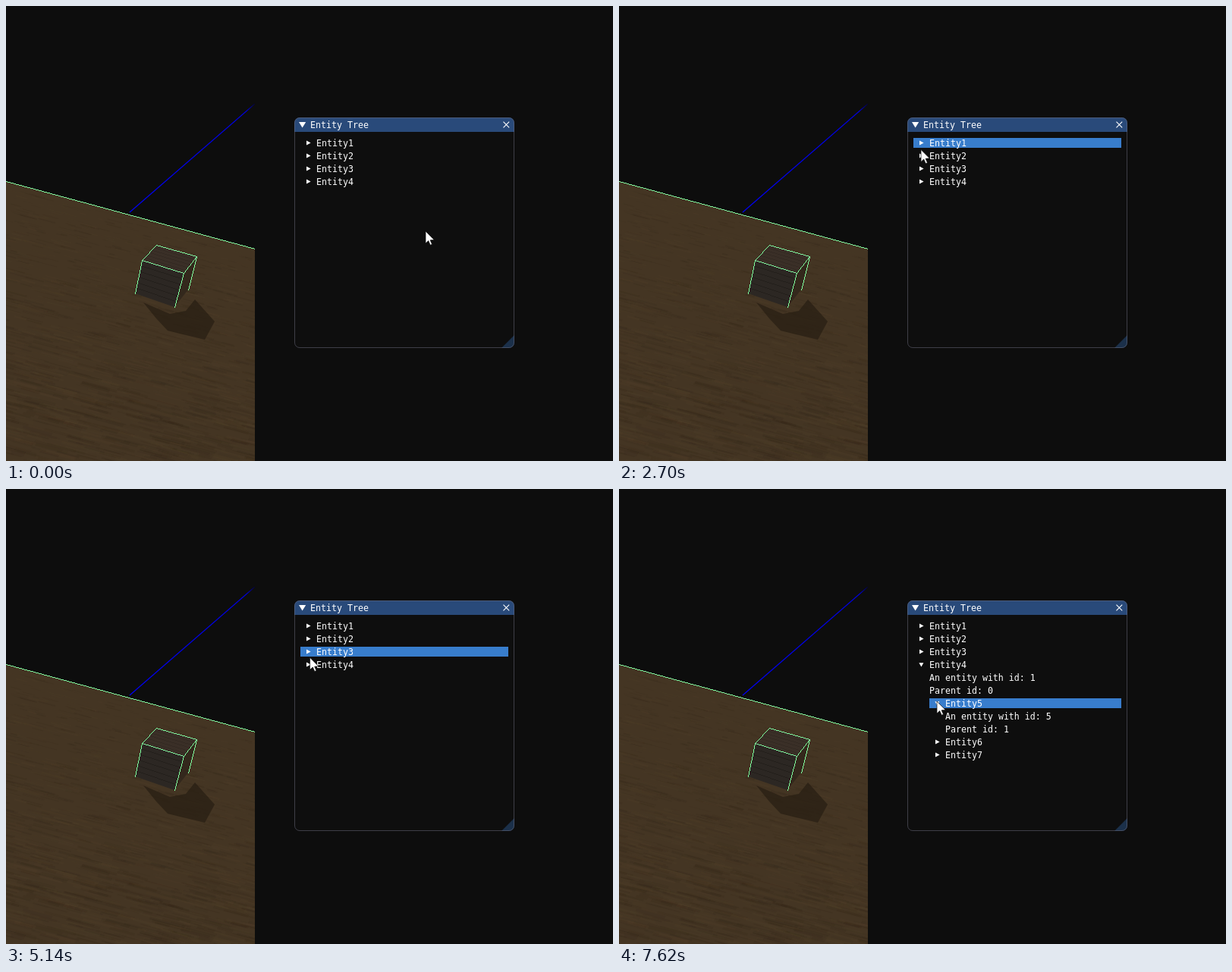
Write an HTML page with a canvas that moves like this. It is 800x600 px and loops after 8000 ms.

```html
<!DOCTYPE html>
<html lang="en">
<head>
<meta charset="utf-8">
<title>Entity tree</title>
<style>
  html, body { margin: 0; width: 100%; height: 100%; overflow: hidden; background: #0d0d0d; }
  canvas, svg { position: absolute; left: 0; top: 0; display: block; }
  text { font: 11.627px "DejaVu Sans Mono", monospace; fill: #fff; white-space: pre; }
</style>
</head>
<body>
<canvas id="scene" width="800" height="600"></canvas>
<svg width="800" height="600" viewBox="0 0 800 600">
  <rect x="380" y="147" width="290" height="304" rx="7" fill="#0e0e0e"/>
  <path d="M380 166V154a7 7 0 0 1 7-7H663a7 7 0 0 1 7 7V166Z" fill="#294a7a"/>
  <path d="M653 451L670 434V444a7 7 0 0 1-7 7Z" fill="#1b304a"/>
  <rect x="380.5" y="147.5" width="289" height="303" rx="6.5" fill="none" stroke="#6e6e80" stroke-opacity=".5"/>
  <path d="M386 153H395.2L390.6 160.6Z" fill="#fff"/>
  <path d="M655.5 152.7L663.2 160.4M663.2 152.7L655.5 160.4" stroke="#fff" stroke-width="1.1"/>
  <text x="401" y="161">Entity Tree</text>
  <g id="rows"></g>
  <path id="cursor" d="M0 0V16L3.7 12.6L6.2 18.2L8.5 17.2L6.1 11.8L11.3 11.4Z"
        fill="#fff" stroke="#111" stroke-width=".7"/>
</svg>
<script>
const LOOP = 8000, STEP = 60, PRESS = 90;
const LEFT = 388, RIGHT = 662, TOP = 174, ROW = 17, INDENT = 21;

// Where the pointer comes to rest: arrival time and place
const STOPS = [
  [150, 552, 298], [750, 422, 241], [1090, 411, 247], [1270, 404, 219],
  [1690, 398, 178], [2730, 398, 201], [3000, 398, 198], [3940, 402, 218],
  [4180, 401, 215], [5180, 400, 233], [5380, 399, 230], [6090, 433, 259],
  [6400, 421, 281], [6760, 419, 280]
];

// Press time and the node it toggles
const CLICKS = [
  [1840, "1"], [2550, "1"], [3150, "2"], [3760, "2"],
  [4390, "3"], [5050, "3"], [5910, "4"], [7530, "5"]
];

const IDS = { 1: 9, 2: 2, 3: 3, 4: 1, 5: 5 };
const CHILDREN = { 4: "567" };

// Longer ways take longer; the pointer advances in fixed time steps
function cursorAt(t) {
  let x = 553, y = 297;
  for (const [end, tx, ty] of STOPS) {
    const dx = tx - x, dy = ty - y;
    const span = STEP + Math.hypot(dx, dy) * 2.6;
    const left = STEP * Math.ceil(Math.max(0, end - t) / STEP);
    const p = Math.max(0, 1 - left / span);
    const eased = p * p * (3 - 2 * p);
    x += dx * eased;
    y += dy * eased;
    if (p < 1) break;
  }
  return [x, y];
}

function openNodes(t) {
  const open = new Set();
  for (const [time, node] of CLICKS)
    if (t >= time + PRESS && !open.delete(node)) open.add(node);
  return open;
}

function listRows(open, nodes = "1234", depth = 0, parent = 0) {
  const rows = [];
  for (const node of nodes) {
    const isOpen = open.has(node);
    rows.push({ node, depth, isOpen, label: "Entity" + node });
    if (!isOpen) continue;
    rows.push({ depth, label: "An entity with id: " + IDS[node] });
    rows.push({ depth, label: "Parent id: " + parent });
    if (CHILDREN[node]) rows.push(...listRows(open, CHILDREN[node], depth + 1, IDS[node]));
  }
  return rows;
}

function rowMarkup(row, i, hot, pressed) {
  const x = LEFT + row.depth * INDENT, y = TOP + i * ROW;
  let out = "";
  if (row.node && hot)
    out += `<rect x="${x}" y="${y}" width="${RIGHT - x}" height="13" fill="${pressed ? "#4296fa" : "#387dcc"}"/>`;
  if (row.node)
    out += row.isOpen
      ? `<path d="M${x + 7.4} ${y + 4.2}h6l-3 5.2Z" fill="#fff"/>`
      : `<path d="M${x + 8} ${y + 3.5}v6l5.6-3Z" fill="#fff"/>`;
  return out + `<text x="${x + INDENT}" y="${y + 11}">${row.label}</text>`;
}

function drawScene() {
  const g = document.getElementById("scene").getContext("2d");
  let seed = 71;
  const rand = () => (seed = seed * 16807 % 2147483647) / 2147483647;
  const mix = (a, b, p) => [a[0] + (b[0] - a[0]) * p, a[1] + (b[1] - a[1]) * p];
  const trace = pts => {
    g.beginPath();
    pts.forEach(p => g.lineTo(...p));
    g.closePath();
  };
  const poly = (fill, ...pts) => {
    trace(pts);
    g.fillStyle = fill;
    g.fill();
  };
  // Hard-edged line, one pixel wide
  const line = (color, a, b) => {
    const n = Math.max(Math.abs(b[0] - a[0]), Math.abs(b[1] - a[1]));
    g.fillStyle = color;
    for (let i = 0; i <= n; i++) g.fillRect(...mix(a, b, i / n).map(Math.round), 1, 1);
  };

  g.fillStyle = "#0d0d0d";
  g.fillRect(0, 0, 800, 600);
  g.beginPath();
  g.rect(0, 0, 328, 600);
  g.clip();

  const blue = g.createLinearGradient(163, 272, 328, 129);
  blue.addColorStop(0, "#0000f0");
  blue.addColorStop(.93, "#0000e0");
  blue.addColorStop(1, "#05052c");
  g.strokeStyle = blue;
  g.lineWidth = 1.3;
  g.beginPath();
  g.moveTo(163, 272);
  g.lineTo(328, 129);
  g.stroke();

  // Wooden floor, planks growing towards the viewer
  g.save();
  trace([[0, 231], [328, 320], [328, 600], [0, 600]]);
  g.clip();
  g.fillStyle = "#443523";
  g.fillRect(0, 0, 328, 600);
  for (let i = 0; i < 2200; i++) {
    const depth = rand() * 380, scale = .5 + depth / 330;
    const x = rand() * 400 - 60, y = 231 + x * .271 + depth;
    const w = (10 + rand() * 28) * scale, h = (.6 + rand() * 2.2) * scale;
    const drop = w * .265;
    const tone = rand() < .5 ? "38,28,17" : "92,74,48";
    poly(`rgba(${tone},${.03 + rand() * .1})`,
      [x, y], [x + w, y + drop], [x + w - h / 2, y + drop + h], [x - h / 2, y + h]);
  }
  g.restore();

  // Box and its shadow
  poly("rgba(34,25,15,.6)", [181, 391], [216, 406], [237, 402], [249, 387],
    [275, 416], [262, 440], [213, 428], [198, 412]);
  const back = [198, 315], right = [251, 330], front = [234, 352], left = [179, 335];
  const leftLow = [170, 379], frontLow = [222, 397], rightLow = [240, 374];
  poly("#33281c", front, right, rightLow, frontLow);
  poly("#2c2723", left, front, frontLow, leftLow);
  poly("#3a2f27", back, right, front, left);
  for (let p = 1 / 6; p < .99; p += 1 / 6) {
    line("#231f1b", mix(left, leftLow, p), mix(front, frontLow, p));
    line("#332922", mix(back, left, p), mix(right, front, p));
  }

  const green = "#80ffa0";
  line(green, [0, 231], [328, 320]);
  const rim = [back, right, front, left];
  rim.forEach((p, i) => line(green, p, rim[(i + 1) % 4]));
  line(green, left, leftLow);
  line(green, front, frontLow);
  line(green, right, rightLow);
}

const rowsEl = document.getElementById("rows");
const cursorEl = document.getElementById("cursor");
let shown = "";

function render(t) {
  // The highlight trails the pointer by one step
  const [hx, hy] = cursorAt(t - STEP);
  const hotRow = hx >= LEFT && hx <= RIGHT ? Math.floor((hy - TOP + 2) / ROW) : -1;
  const pressed = CLICKS.some(([time]) => t >= time && t < time + PRESS);
  const markup = listRows(openNodes(t))
    .map((row, i) => rowMarkup(row, i, i === hotRow, pressed)).join("");
  if (markup !== shown) rowsEl.innerHTML = shown = markup;
  cursorEl.setAttribute("transform", `translate(${cursorAt(t).join(" ")})`);
}

drawScene();
render(0);
const begin = performance.now();
requestAnimationFrame(function tick() {
  render((performance.now() - begin) % LOOP);
  requestAnimationFrame(tick);
});
</script>
</body>
</html>
```
